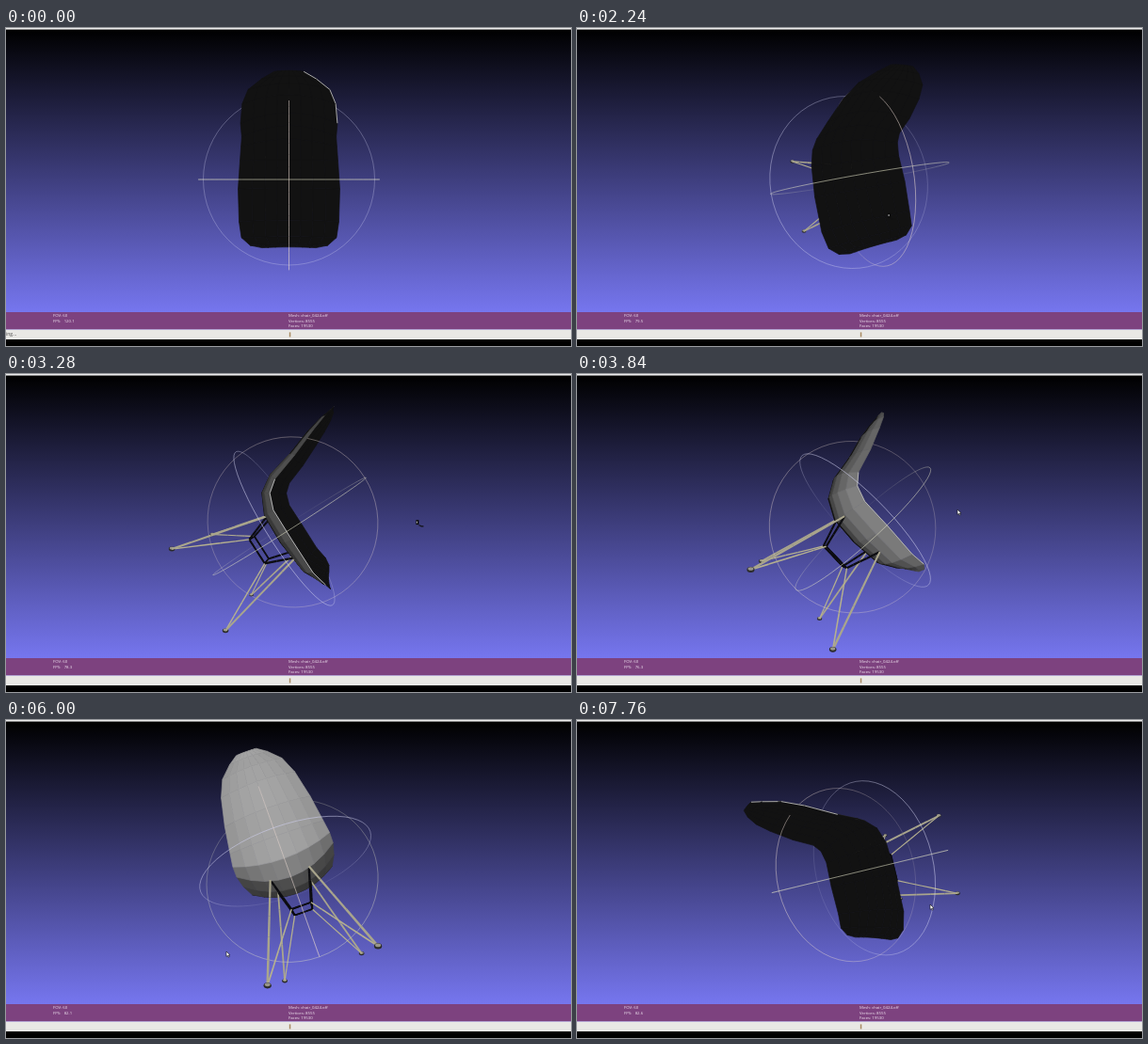
An HTML page with a canvas that plays this animation: 600 by 338 pixels, repeating every 8 s.

```html
<!DOCTYPE html>
<html lang="en">
<head>
<meta charset="utf-8">
<title>Chair mesh viewer</title>
<style>
html, body { margin: 0; width: 100%; height: 100%; overflow: hidden; background: #000; }
canvas, svg { position: absolute; left: 0; top: 0; width: 600px; height: 338px; display: block; }
text { font: 4.3px "Open Sans", "Noto Sans", sans-serif; fill: #f1e6f1; white-space: pre; }
</style>
</head>
<body>
<canvas id="scene" width="600" height="338"></canvas>
<svg viewBox="0 0 600 338">
  <rect width="600" height="1.6" fill="#ececec"/>
  <rect y="302" width="600" height="18.5" fill="#7d427f"/>
  <rect y="320.5" width="600" height="10.5" fill="#e9e8e5"/>
  <rect y="331" width="600" height="7" fill="#000"/>
  <text x="50" y="307.4">FOV: 60</text>
  <text id="fps" x="50" y="312.8"></text>
  <text x="300" y="307.4">Mesh: chair_0424.off</text>
  <text x="300" y="312.8">Vertices: 8555</text>
  <text x="300" y="318.4">Faces: 19530</text>
  <text id="status" x="0" y="327.4" style="fill:#444;font-size:5px">ing...</text>
  <rect x="300.8" y="323.4" width="1.5" height="5" fill="#a98a62"/>
  <g id="cursor">
    <path id="arrow" d="M0 0V5.4L1.3 4.3L2.2 6.2L3.2 5.8L2.3 3.9H4Z" fill="#fff" stroke="#111" stroke-width=".6"/>
    <g id="grab">
      <path d="M-1 -3H2V2H-1Z" fill="#0b0b0b"/>
      <path d="M0 -1.5V0.5" stroke="#ddd" stroke-width=".9"/>
      <path d="M2 2.6L4.5 3.4M4 3.8H7" stroke="#111" stroke-width="1.1"/>
    </g>
  </g>
</svg>
<script>
const LOOP = 8000, CX = 300.5, CY = 161, FOCAL = 275, BALL = 91;
const $ = id => document.getElementById(id);
const ctx = $("scene").getContext("2d");

// vectors
const add = (a, b, k = 1) => a.map((v, i) => v + b[i] * k);
const dot = (a, b) => a[0] * b[0] + a[1] * b[1] + a[2] * b[2];
const cross = (a, b) => [a[1] * b[2] - a[2] * b[1], a[2] * b[0] - a[0] * b[2], a[0] * b[1] - a[1] * b[0]];
const unit = a => { const l = Math.hypot(...a); return a.map(v => v / l); };
const mix = (a, b, f) => a.map((v, i) => v + (b[i] - v) * f);

// quaternion of the pose whose chair back and chair up point along y and z
function pose(y, z) {
  z = unit(z);
  const x = unit(cross(y, z));
  y = cross(z, x);
  const w = Math.sqrt(1 + x[0] + y[1] + z[2]) / 2;
  return unit([w, (y[2] - z[1]) / (4 * w), (z[0] - x[2]) / (4 * w), (x[1] - y[0]) / (4 * w)]);
}

function slerp(a, b, f) {
  let c = a.reduce((s, v, i) => s + v * b[i], 0);
  if (c < 0) { b = b.map(v => -v); c = -c; }
  if (c > 0.9999) return a;
  const h = Math.acos(c);
  return a.map((v, i) => (v * Math.sin((1 - f) * h) + b[i] * Math.sin(f * h)) / Math.sin(h));
}

function turn(q, p) {
  const v = q.slice(1), t = cross(v, p).map(k => 2 * k);
  return add(add(p, t, q[0]), cross(v, t));
}

// linear track through [time, ...values]
function track(keys, t) {
  let i = 0;
  while (i < keys.length - 2 && t > keys[i + 1][0]) i++;
  const [a, b] = [keys[i], keys[i + 1]];
  const f = Math.min(1, Math.max(0, (t - a[0]) / (b[0] - a[0])));
  return mix(a, b, f).slice(1);
}

const POSES = [
  pose([0, 1, 0], [0, 0, 1]),
  pose([-0.33, 0.945, 0], [0.734, 0.256, 0.63]),
  pose([-0.67, 0.738, 0.145], [0.699, 0.683, -0.24]),
  pose([-0.468, 0.437, 0.769], [0.224, 0.899, -0.375]),
  pose([-0.126, 0.353, 0.927], [-0.312, 0.873, -0.375]),
  pose([-0.235, 0.97, 0], [-0.745, -0.18, 0.643])
];
const TURNS = [[1640, 0], [2800, 1], [3700, 2], [4640, 2], [5120, 3], [5520, 4],
  [6040, 4], [7200, 4.75], [7360, 4.75], [7680, 5]];
const POINTER = [[200, 196, 296], [700, 271, 211], [1640, 271, 211], [2800, 387, 189], [3240, 432, 165],
  [3520, 462, 118], [3760, 404, 144], [4200, 404, 144], [4560, 197, 186], [4680, 197, 186],
  [5120, 377, 220], [5360, 430, 125], [5540, 377, 64], [5720, 223, 272], [5840, 234, 246],
  [6040, 234, 246], [6840, 468, 165], [7200, 459, 192], [7360, 459, 192], [7700, 375, 196]];
const DRAGS = [[1680, 3540], [4680, 5540], [6060, 7360]];
const FPS = [[1600, 120.1], [1760, 79], [2800, 80], [3840, 76.3], [4640, 76.3], [5120, 78.1],
  [5520, 82.1], [6080, 82.1], [7200, 82.6]];

// shell rows from the top of the back to the seat front: y, z, half width, bulge
const ROWS = [[73, 100, 10, 1], [70, 95, 19, 3], [66, 85, 30, 6], [60, 70, 37, 9], [50, 45, 43, 11],
  [42, 20, 46.5, 14], [34, 10, 49, 17], [20, 5, 51, 20], [-10, 5, 53, 21], [-44, 5, 52, 17],
  [-60, 8, 49, 10], [-68, 8, 40, 4], [-71, 6, 28, 1]];
const COLS = 8;
const shell = ROWS.map(([y, z, w, bulge], i) => {
  const a = ROWS[Math.max(0, i - 1)], b = ROWS[Math.min(ROWS.length - 1, i + 1)];
  const n = unit([0, a[1] - b[1], b[0] - a[0]]);
  return Array.from({ length: COLS + 1 }, (_, j) => {
    const t = j / COLS * 2 - 1;
    return add([w * t, y, z], n, bulge * (1 - t * t));
  });
});

// wire base
const rods = [], feet = [];
const corner = (sx, front, x, rear, fore, z) => [sx * x, front ? fore : rear, z];
for (const sx of [-1, 1]) for (const front of [false, true]) {
  const foot = corner(sx, front, 45, 42, -52, -100);
  const mount = corner(sx, front, 20, 20, -30, front ? -8 : -10);
  const hub = corner(sx, front, 10, 10, -20, -42);
  feet.push(foot);
  rods.push([foot, mount, "#a9a58c", 1.9], [foot, hub, "#b5b08f", 1.3],
    [mount, hub, "#0c0c10", 2.1],
    [hub, corner(-sx, front, 10, 10, -20, -42), "#0c0c10", 1.6],
    [hub, corner(sx, !front, 10, 10, -20, -42), "#0c0c10", 1.6]);
}

const scale = p => FOCAL / (FOCAL - p[2]);
const project = p => [CX + p[0] * scale(p), CY - p[1] * scale(p)];

function path(points, close) {
  ctx.beginPath();
  points.forEach(p => ctx.lineTo(...project(p)));
  if (close) ctx.closePath();
}

function line(points, color, width) {
  path(points);
  ctx.strokeStyle = color;
  ctx.lineWidth = width;
  ctx.stroke();
}

function drawScene(q) {
  const sky = ctx.createLinearGradient(0, 2, 0, 320);
  sky.addColorStop(0, "#000");
  sky.addColorStop(1, "rgb(125,125,253)");
  ctx.fillStyle = sky;
  ctx.fillRect(0, 0, 600, 338);
  ctx.lineJoin = "round";

  const items = [];
  const put = (p, draw, bias = 0) => items.push({ far: Math.hypot(p[0], p[1], FOCAL - p[2]) - bias, draw });
  const grid = shell.map(row => row.map(p => turn(q, p)));
  const side = turn(q, [1, 0, 0])[2];

  for (let i = 0; i < ROWS.length - 1; i++) for (let j = 0; j < COLS; j++) {
    const quad = [grid[i][j], grid[i][j + 1], grid[i + 1][j + 1], grid[i + 1][j]];
    const mid = mix(mix(quad[0], quad[2], 0.5), mix(quad[1], quad[3], 0.5), 0.5);
    const n = unit(cross(add(quad[2], quad[0], -1), add(quad[1], quad[3], -1)));
    const inner = dot(n, [-mid[0], -mid[1], FOCAL - mid[2]]) > 0;
    const g = Math.round(16 + 150 * Math.abs(n[2]));
    put(mid, () => {
      path(quad, true);
      ctx.fillStyle = ctx.strokeStyle = inner ? "#121212" : `rgb(${g},${g},${g})`;
      ctx.lineWidth = 0.7;
      ctx.fill();
      ctx.stroke();
    }, inner ? 8 : -8);
    // lit stretches of the rim
    const back = j === COLS - 1 && i < 4 && inner && side > -0.01;
    const seat = j === 0 && i > 4 && i < 10 && side < -0.85;
    if (back || seat) {
      const e = back ? COLS : 0;
      put(mid, () => line([grid[i][e], grid[i + 1][e]], "#bdbdbd", 0.9), 9);
    }
  }

  for (const [a, b, color, width] of rods) {
    const [p, r] = [turn(q, a), turn(q, b)], parts = 5;
    for (let k = 0; k < parts; k++) {
      const s = mix(p, r, k / parts), e = mix(p, r, (k + 1) / parts), m = mix(s, e, 0.5);
      put(m, () => line([s, e], color, width * scale(m)));
    }
  }

  for (const f of feet) {
    const p = turn(q, f), s = scale(p), [x, y] = project(p);
    put(p, () => {
      ctx.fillStyle = "#2b2b2b";
      ctx.beginPath();
      ctx.ellipse(x, y, 3 * s, 2.2 * s, 0, 0, 7);
      ctx.fill();
      ctx.fillStyle = "#98958a";
      ctx.beginPath();
      ctx.ellipse(x, y - 0.7 * s, 2.2 * s, 1.3 * s, 0, 0, 7);
      ctx.fill();
    }, 2);
  }

  const steps = 64;
  for (let axis = 0; axis < 3; axis++) for (let k = 0; k < steps; k++) {
    const at = n => {
      const h = n / steps * 2 * Math.PI, p = [0, 0, 0];
      p[(axis + 1) % 3] = BALL * Math.cos(h);
      p[(axis + 2) % 3] = BALL * Math.sin(h);
      return turn(q, p);
    };
    const a = at(k), b = at(k + 1), m = mix(a, b, 0.5);
    const tint = ["228,212,205", "222,222,196", "208,208,238"][axis];
    const alpha = 0.36 + 0.3 * m[2] / BALL;
    put(m, () => line([a, b], `rgba(${tint},${alpha})`, 0.9));
  }

  items.sort((a, b) => b.far - a.far).forEach(o => o.draw());
}

function render(t) {
  const [p] = track(TURNS, t), i = Math.min(POSES.length - 2, Math.floor(p));
  drawScene(slerp(POSES[i], POSES[i + 1], p - i));

  const [x, y] = track(POINTER, t);
  const drag = DRAGS.some(([a, b]) => t >= a && t < b);
  $("cursor").setAttribute("transform", `translate(${x} ${y})`);
  $("cursor").style.display = t < 200 ? "none" : "";
  $("arrow").style.display = drag ? "none" : "";
  $("grab").style.display = drag ? "" : "none";
  $("status").style.display = t < 160 ? "" : "none";
  $("fps").textContent = "FPS:   " + track(FPS, Math.floor(t / 80) * 80)[0].toFixed(1);
}

function tick() {
  render(performance.now() % LOOP);
  requestAnimationFrame(tick);
}
tick();
</script>
</body>
</html>
```
